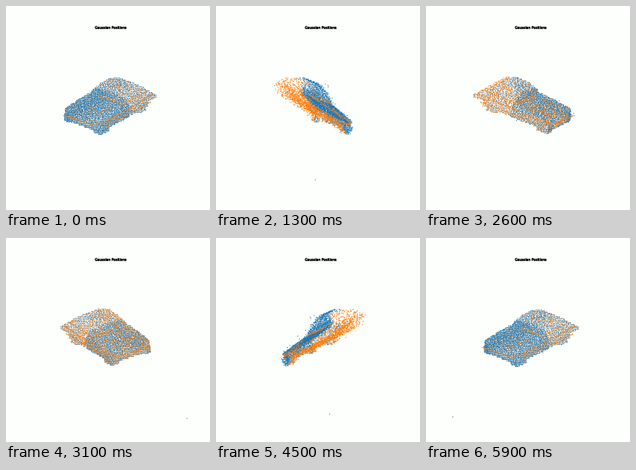
These frames come from a looping animation (256 by 256 pixels, 6 s). A matplotlib script:

```python
import numpy as np
import matplotlib
import matplotlib.pyplot as plt
from matplotlib import patheffects
from matplotlib.animation import FuncAnimation
from matplotlib.colors import to_rgba
from matplotlib.patches import Rectangle

SIZE, DPI = 256, 100
FRAMES, STEP_MS = 60, 100
AXIS_X, AXIS_Y, DIST = 128, 128, 1750
PAPER = "#fdfffd"
BLUE, ORANGE = to_rgba("C0"), to_rgba("C1")

matplotlib.rcParams["text.hinting"] = "none"
rng = np.random.default_rng(4)

# Rows: the car's tailward, sideward and upward axes as (right, down, near).
CAR = np.array([[.633, -.342, -.700],
                [.773, .276, .571],
                [0, -.899, .438]])
CENTRE = np.array([0, 3.5, -11.0])


def solid(planes, mirrored):
    """Half-spaces n.p <= d; the mirrored ones hold on both flanks."""
    mirrored = np.array(mirrored, float)
    return np.vstack([planes, mirrored, mirrored * [1, -1, 1, 1]])


def block(l0, l1, w0, w1, h0, h1):
    return np.array([[-1, 0, 0, -l0], [1, 0, 0, l1], [0, -1, 0, -w0],
                     [0, 1, 0, w1], [0, 0, -1, -h0], [0, 0, 1, h1]], float)


LOWER = solid([[-1, 0, 0, 57], [1, 0, 0, 52], [0, 0, -1, 0],
               [-.14, 0, 1, 18], [.12, 0, 1, 23], [-1, 0, -.9, 54]],
              [[0, 1, 0, 31], [-1, .6, 0, 65], [1, .6, 0, 62],
               [0, 1, .8, 42]])
CABIN = solid([[0, 0, -1, -8], [0, 0, 1, 33.5], [-.95, 0, 1, 20],
               [.85, 0, 1, 60], [-.35, 0, 1, 28], [.35, 0, 1, 43]],
              [[0, 1, .56, 37.5], [0, .5, 1, 39]])
SOLIDS = [LOWER, CABIN,
          block(-52, -36, 19, 31, -4, 6), block(24, 38, 20, 31, -4, 6),
          block(-50, -36, -30, -20, -4, 6)]


def span(planes, x, y):
    """Nearest and farthest depth of a solid along each viewing ray."""
    start = np.column_stack([x, y]) @ CAR[:, :2].T
    slope = planes[:, :3] @ CAR[:, 2]
    room = planes[:, 3] - start @ planes[:, :3].T
    depth = room / slope
    near = np.where(slope > 0, depth, np.inf).min(axis=1)
    far = np.where(slope < 0, depth, -np.inf).max(axis=1)
    hit = near > far
    return np.where(hit, near, -np.inf), np.where(hit, far, np.inf)


def cast(dx, dy, offset):
    """Front and back of the car on a slightly wavy grid of rays."""
    x, y = np.meshgrid(np.arange(-62, 62, dx), np.arange(-42, 34, dy) + offset)
    x, y = x.ravel(), y.ravel()
    y = y + 1.1 * np.sin(x / 13 + y / 9)
    x, y = (c + rng.normal(0, .18, c.size) for c in (x, y))
    near, far = zip(*(span(s, x, y) for s in SOLIDS))
    near, far = np.max(near, axis=0), np.min(far, axis=0)
    hit = np.isfinite(near)
    return np.column_stack([x, y, near])[hit], far[hit]


def blur(points, spread):
    """Noise along the viewing ray, with a few strays."""
    points = points + rng.normal(0, .2, points.shape)
    points[:, 2] += rng.normal(0, spread, len(points))
    stray = rng.random(len(points)) < .03
    points[stray] += rng.normal(0, 1, (stray.sum(), 3)) * [1.2, 1.2, 6]
    return points


def stripe(start, end, count):
    """Dotted line between two places given in car coordinates."""
    k = np.linspace(0, 1, count)[:, None]
    line = (np.array(start) * (1 - k) + np.array(end) * k) @ CAR
    return line + rng.normal(0, .45, line.shape)


def far_point(radius, drop, frame):
    """A lone point that is farthest from the viewer at the given frame."""
    a = np.radians(6 * frame)
    return [radius * np.sin(a), drop, -radius * np.cos(a)]


front, far = cast(1.5, 2.0, 0)
back = front.copy()
back[:, 2] += rng.uniform(.6, .95, len(far)) * (far - front[:, 2])
back = back[rng.random(len(back)) < .85]

# The bonnet is sampled more densely than the rest.
fill, _ = cast(1.3, 1.9, 1)
fill = fill[(fill @ CAR.T)[:, 0] < 4]

stripes = np.vstack([
    stripe((-45, 31, 10), (51, 31, 13), 75),
    stripe((-40, 31, 5), (48, 31, 4), 60),
    stripe((-57, -24, 8), (-55, 20, 8), 38),
    stripe((-55, 20, 8), (-45, 31, 10), 14),
    stripe((-2, -14, 18), (-2, 27, 18), 26),
    stripe((0, 28, 19), (46, 27, 19), 30),
    stripe((-48, 10, 12), (-20, 16, 16), 18),
])

lone = np.array([far_point(99, 98, 46.5), far_point(111, 95.7, 12.7)])
blue = np.vstack([blur(front, 1.2), blur(fill, 1.2)]) + CENTRE
orange = blur(back, 1.5) + CENTRE
stripes = stripes + CENTRE

cloud = np.vstack([lone, blue, orange, stripes])
layer = np.repeat([0, 0, 1, 2], [len(lone), len(blue), len(orange), len(stripes)])
colours = np.array([BLUE, ORANGE, ORANGE])[layer]

fig = plt.figure(figsize=(SIZE / DPI, SIZE / DPI), dpi=DPI, facecolor=PAPER)
ax = fig.add_axes([0, 0, 1, 1])
ax.set_xlim(0, SIZE)
ax.set_ylim(SIZE, 0)
ax.axis("off")
ax.text(131.4, 28.6, "Gaussian Positions", fontsize=3.07, ha="center",
        va="baseline", color="black",
        path_effects=[patheffects.withStroke(linewidth=.25, foreground="black")])
dots = ax.scatter(cloud[:, 0], cloud[:, 1], s=.7, linewidths=0)
window = Rectangle((32.6, 30.7), 197.1, 197.1, transform=ax.transData)
dots.set_clip_path(window)


def draw(i):
    a = np.radians(6 * i)
    x, y, t = cloud.T
    depth = t * np.cos(a) - x * np.sin(a)
    scale = 1 / (1 - depth / DIST)
    px = AXIS_X + (x * np.cos(a) + t * np.sin(a)) * scale
    py = AXIS_Y + y * scale
    blue_on_top = i < 6 or i > 56
    rank = np.array([1, 0, 2] if blue_on_top else [0, 1, 2])[layer]
    order = np.lexsort((depth, rank))
    dots.set_offsets(np.column_stack([px, py])[order])
    dots.set_facecolors(colours[order])
    return (dots,)


anim = FuncAnimation(fig, draw, frames=FRAMES, interval=STEP_MS, repeat=True,
                     repeat_delay=0, blit=False)
plt.show()
```
